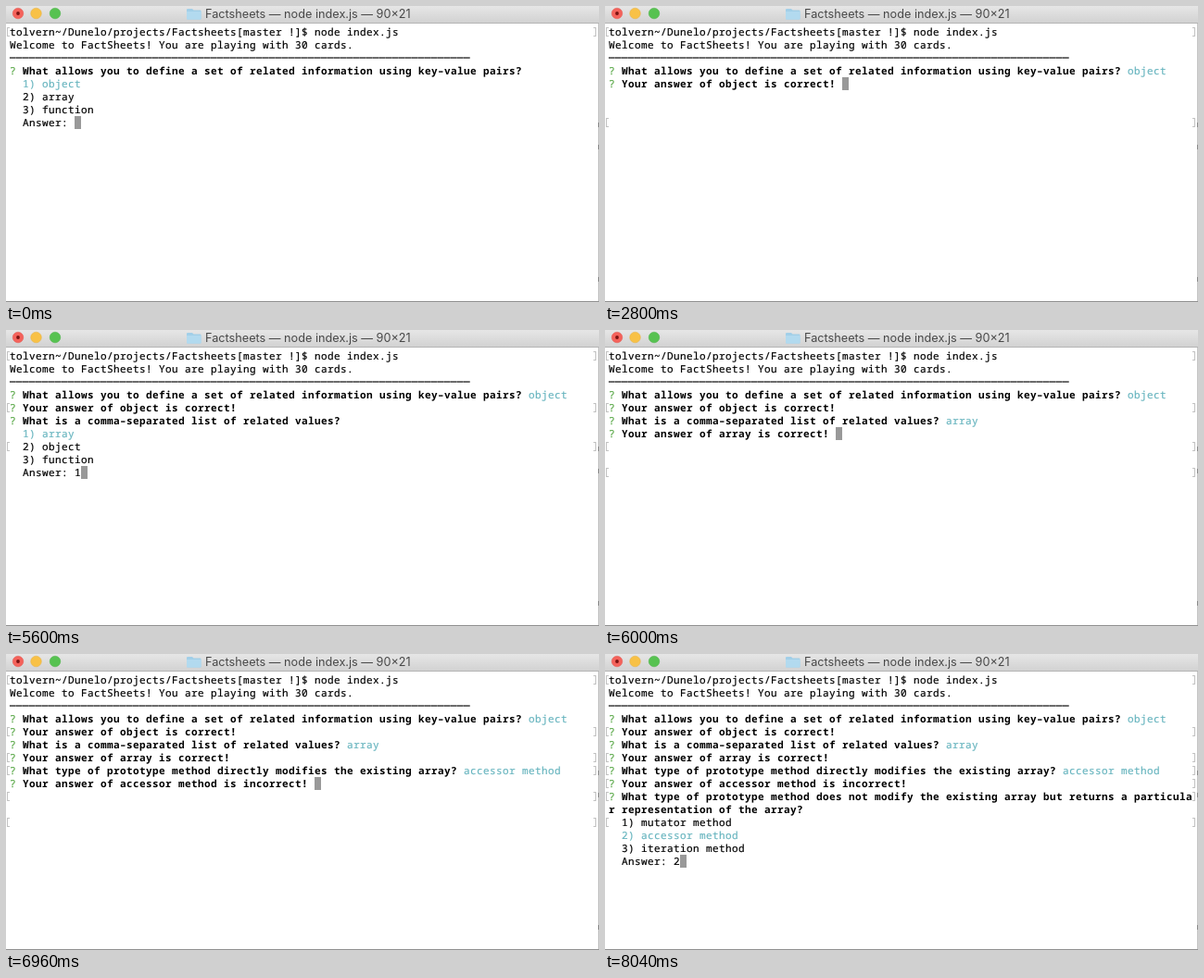
Animation, 640 px wide and 320 px high, one loop 8080 ms. Source, as an HTML page:

```html
<!DOCTYPE html>
<html lang="en">
<head>
<meta charset="utf-8">
<title>Quiz terminal</title>
<style>
html, body { margin: 0; width: 100%; height: 100%; overflow: hidden; background: #fff; }
#win { position: relative; width: 640px; height: 320px; overflow: hidden; background: #fff; }
#bar {
  position: absolute; left: 0; top: 0; width: 640px; height: 18px;
  background: linear-gradient(#e6e6e6, #d2d2d2); border-bottom: 1px solid #b4b4b4;
}
#bar svg { position: absolute; left: 0; top: 0; }
#bar span {
  position: absolute; left: 215px; top: 0; white-space: pre;
  font: 12.7px/17px Inter, sans-serif; color: #484848;
}
#edge { position: absolute; right: 0; top: 19px; width: 1px; height: 301px; background: #c4c4c4; }
#edge i { position: absolute; left: 0; width: 1px; height: 5px; background: #888; }
#foot { position: absolute; left: 0; bottom: 0; width: 640px; height: 1px; background: #909090; }
#text {
  position: absolute; left: 4px; top: 22px; white-space: pre; color: #000;
  font: 11px/14px "Noto Sans Mono", "DejaVu Sans Mono", monospace;
  letter-spacing: .4px; text-rendering: geometricPrecision;
  -webkit-text-stroke: .2px;
}
#text div { height: 14px; }
#text b { font-weight: 700; -webkit-text-stroke: 0; }
.pick { color: #68b5bf; }
.mark { color: #5aa848; }
.rule, .cursor { position: relative; top: -1px; }
.cursor { display: inline-block; width: 7px; height: 14px; background: #999; vertical-align: top; }
.brk { position: absolute; width: 2px; height: 8px; border: 1px solid #c2c2c2; }
.brk.l { left: 1px; border-right: 0; }
.brk.r { left: 634px; border-left: 0; }
</style>
</head>
<body>
<div id="win">
  <div id="bar">
    <svg width="640" height="18">
      <g stroke-width=".5">
        <circle cx="13" cy="8" r="5.8" fill="#f4625b" stroke="#e2564f"/>
        <circle cx="32.5" cy="8" r="5.8" fill="#f8c146" stroke="#e6af3a"/>
        <circle cx="53" cy="8" r="5.8" fill="#57c251" stroke="#49b044"/>
      </g>
      <circle cx="13" cy="8" r="1.9" fill="#7a1210"/>
      <path d="M195 4q0-1 1-1h5l1.500 1.500h7q1 0 1 1v8q0 1-1 1h-13.500q-1 0-1-1z" fill="#a2cfe8"/>
      <path d="M195 6h15.500v7.500q0 1-1 1h-13.500q-1 0-1-1z" fill="#b2daef"/>
    </svg>
    <span>Factsheets — node index.js — 90×21</span>
  </div>
  <div id="text"></div>
  <div id="marks"></div>
  <div id="edge"><i style="top:107px"></i><i style="top:131px"></i><i style="top:274px"></i></div>
  <div id="foot"></div>
</div>
<script>
const LOOP = 8080, COLS = 90;
const methods = ['mutator method', 'accessor method', 'iteration method'];

// at: asked, typed, answered, verdict shown, dismissed
const quiz = [
  { ask: 'What allows you to define a set of related information using key–value pairs?',
    opts: ['object', 'array', 'function'], pick: 0, ok: true, at: [0, 2560, 2720, 2760, 3560] },
  { ask: 'What is a comma–separated list of related values?',
    opts: ['array', 'object', 'function'], pick: 0, ok: true, at: [3600, 5560, 5760, 5800, 6360] },
  { ask: 'What type of prototype method directly modifies the existing array?',
    opts: methods, pick: 1, ok: false, at: [6400, 6720, 6920, 6960, 7560] },
  { ask: 'What type of prototype method does not modify the existing array but returns a particular representation of the array?',
    opts: methods, pick: 1, at: [7600, 8040] }
];
const times = quiz.flatMap(q => q.at);

const span = (cls, s) => `<span class="${cls}">${s}</span>`;
const cursor = span('cursor', '');
const prompt = s => span('mark', '?') + ` <b>${s}</b>`;

function screen(t) {
  const lines = [
    'tolvern~/Dunelo/projects/Factsheets[master !]$ node index.js',
    'Welcome to FactSheets! You are playing with 30 cards.',
    span('rule', '—'.repeat(71))
  ];
  const marked = [0];
  for (const { ask, opts, pick, ok, at } of quiz) {
    const stage = at.filter(a => a <= t).length;
    if (!stage) break;
    const answered = stage > 2;
    lines.push(prompt(ask.slice(0, COLS - 2)) + (answered ? ' ' + span('pick', opts[pick]) : ''));
    if (ask.length > COLS - 2) lines.push(`<b>${ask.slice(COLS - 2)}</b>`);
    if (!answered) {
      const lit = stage > 1 ? pick : 0;
      opts.forEach((o, i) => {
        const row = `  ${i + 1}) ${o}`;
        lines.push(i === lit ? span('pick', row) : row);
      });
      lines.push('  Answer: ' + (stage > 1 ? pick + 1 : '') + cursor);
      continue;
    }
    marked.push(lines.length + opts.length);
    if (stage > 3) {
      lines.push(prompt(`Your answer of ${opts[pick]} is ${ok ? '' : 'in'}correct!`) +
        (stage > 4 ? '' : ' ' + cursor));
    }
    if (stage > 4) marked.push(lines.length - 1);
  }
  return { lines, marked };
}

const text = document.getElementById('text');
const marks = document.getElementById('marks');
const start = performance.now();
let shown = -1;

function frame() {
  const t = (performance.now() - start) % LOOP;
  const step = times.filter(a => a <= t).length;
  if (step !== shown) {
    shown = step;
    const { lines, marked } = screen(t);
    text.innerHTML = lines.map(l => `<div>${l}</div>`).join('');
    marks.innerHTML = marked.map(r => ['l', 'r'].map(side =>
      `<div class="brk ${side}" style="top:${23 + r * 14}px"></div>`).join('')).join('');
  }
  requestAnimationFrame(frame);
}
frame();
</script>
</body>
</html>
```
